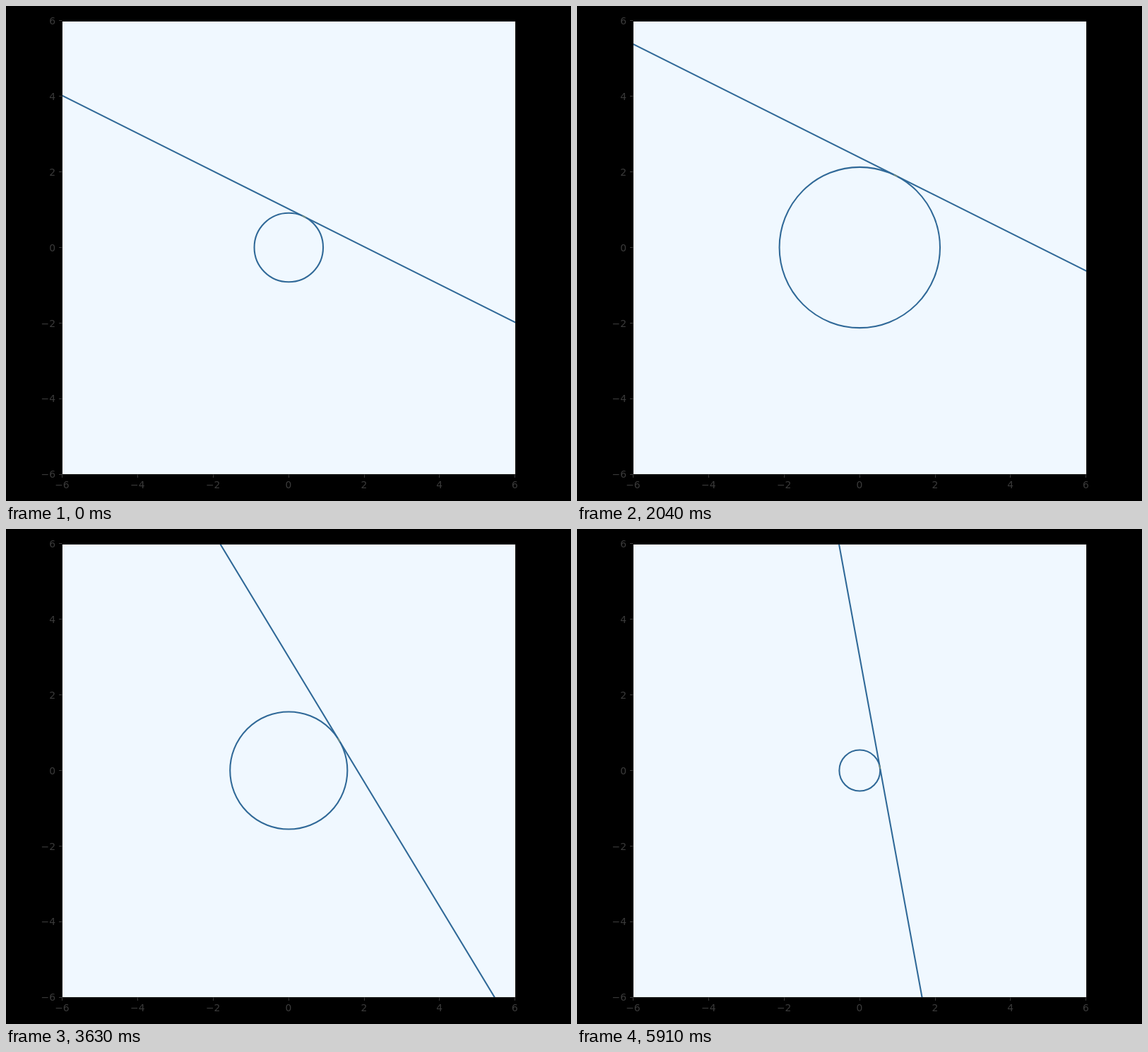
Animation, 800 px wide and 700 px high, one loop 5.94 s. Source, as an HTML page:

```html
<!DOCTYPE html>
<html lang="en">
<head>
<meta charset="utf-8">
<title>Tangent line and circle</title>
<style>
  html, body { margin: 0; width: 100%; height: 100%; overflow: hidden; background: #000; }
  svg { display: block; width: 800px; height: 700px; }
  text { font: 13.89px "DejaVu Sans", sans-serif; fill: #3a3a3a; }
  .tick { stroke: #3a3a3a; stroke-width: 1; }
  .curve { fill: none; stroke: #306998; stroke-width: 2.08; stroke-linecap: square; }
  .touch { stroke: #ffd43b; stroke-width: 1; opacity: .55; }
</style>
</head>
<body>
<svg viewBox="0 0 800 700">
  <clipPath id="plot"><rect x="80" y="22" width="641" height="640"/></clipPath>
  <rect x="79.5" y="21.5" width="642" height="641" fill="#333"/>
  <rect x="80" y="22" width="641" height="640" fill="#f0f8ff"/>
  <g id="axes"></g>
  <g clip-path="url(#plot)">
    <path id="circle" class="curve"/>
    <path id="line" class="curve"/>
    <path id="touch" class="touch"/>
  </g>
</svg>
<script>
const FRAME_MS = 30, FRAMES = 198, GROWING = 99;
const UNIT = 53.42;
const px = x => 400.3 + x * UNIT;
const py = y => 341.5 - y * UNIT;
const $ = id => document.getElementById(id);

function add(name, attrs, label = "") {
  const node = document.createElementNS("http://www.w3.org/2000/svg", name);
  for (const key in attrs) node.setAttribute(key, attrs[key]);
  node.textContent = label;
  $("axes").append(node);
}

for (let v = -6; v <= 6; v += 2) {
  const label = String(v).replace("-", "\u2212");
  const x = Math.floor(px(v)) + .5, y = Math.floor(py(v)) + .5;
  add("path", { class: "tick", d: `M75 ${y}H79.5M${x} 662.5V667` });
  add("text", { x: 70, y: py(v) + 5.2, "text-anchor": "end" }, label);
  add("text", { x: px(v) - .3, y: 682, "text-anchor": "middle" }, label);
}

const segment = (x1, y1, x2, y2) => `M${px(x1)} ${py(y1)}L${px(x2)} ${py(y2)}`;

// The line y = b - m x first rises, then steepens; the circle stays tangent to it.
function draw(step) {
  const growing = step < GROWING;
  const b = growing ? 1.02 + .02 * step : 3;
  const m = growing ? .5 : .55 + .05 * (step - GROWING);
  const norm = Math.hypot(1, m);
  const r = b / norm;
  const tx = r * m / norm, ty = r / norm;
  const dx = .055 / norm, dy = -m * dx;
  const R = r * UNIT;

  $("circle").setAttribute("d",
    `M${px(r)} ${py(0)}A${R} ${R} 0 0 0 ${px(-r)} ${py(0)}A${R} ${R} 0 0 0 ${px(r)} ${py(0)}`);
  $("line").setAttribute("d", segment(-8, b + 8 * m, 8, b - 8 * m));
  $("touch").setAttribute("d", segment(tx - dx, ty - dy, tx + dx, ty - -dy));
}

const start = performance.now();
function tick() {
  const elapsed = performance.now() - start;
  draw(Math.floor(elapsed / FRAME_MS) % FRAMES);
  requestAnimationFrame(tick);
}
tick();
</script>
</body>
</html>
```
